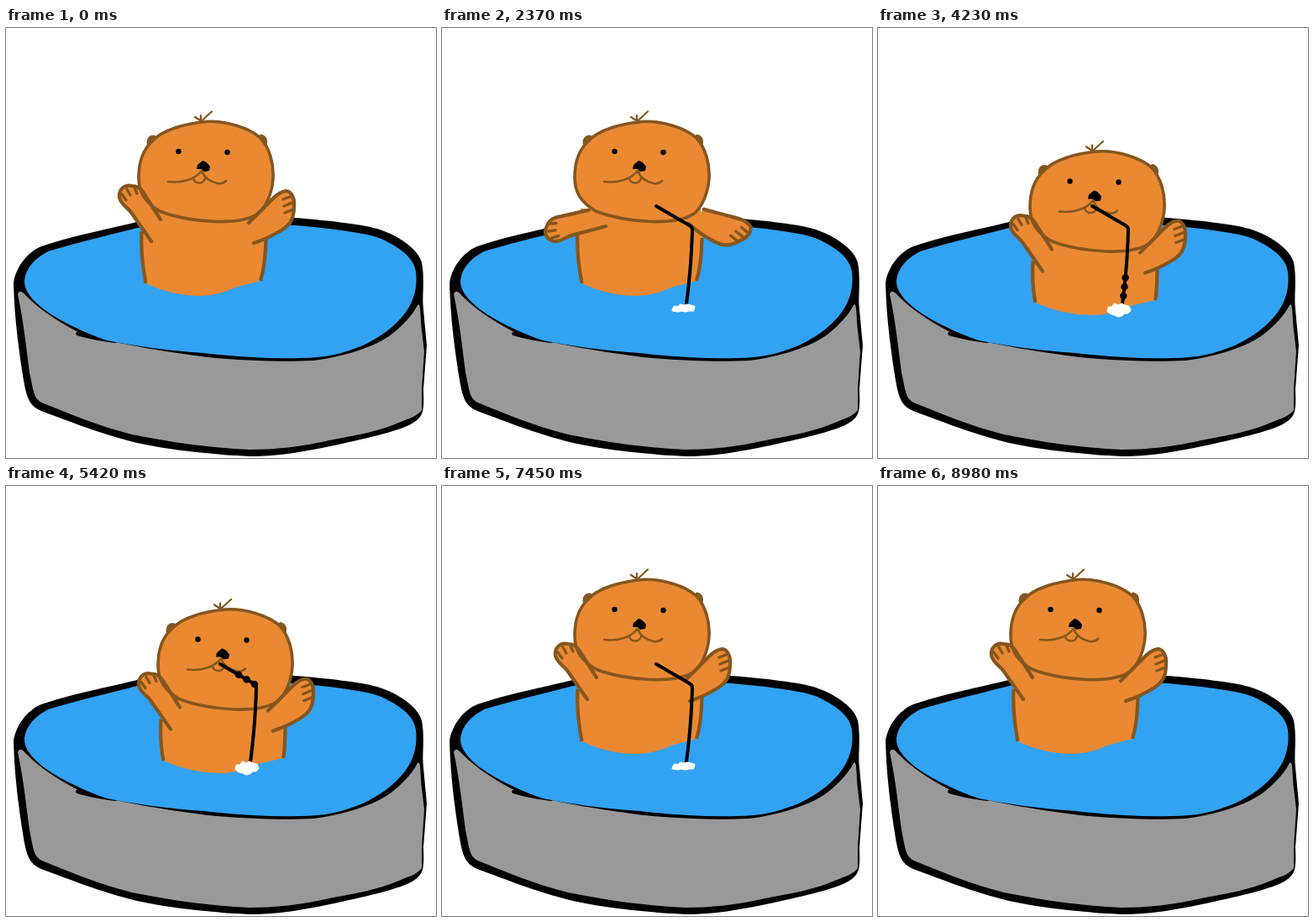
An HTML page for the animation above (9150 ms loop, 512 by 512 pixels).

```html
<!DOCTYPE html>
<html lang="en">
<head>
<meta charset="utf-8">
<title>Otter in the pool</title>
<style>
html, body { margin: 0; width: 100%; height: 100%; overflow: hidden; background: #fff; }
svg { display: block; width: 100%; height: 100%; }
.fur { fill: #ea8932; }
.line { fill: none; stroke: #85561f; stroke-width: 4.2; stroke-linecap: round; stroke-linejoin: round; }
.thin { stroke-width: 2.6; }
.claw { stroke-width: 3.4; }
.hair { stroke-width: 2.2; }
</style>
</head>
<body>
<svg viewBox="0 0 512 512">
  <defs>
    <clipPath id="above"><path d="M0 0H512V329H0Z"/></clipPath>
    <path id="armL" d="M184 228L168 203C163 195 160 188 150 188C140 186 134 193 135 202C138 212 144 212 150 221L173 254"/>
    <path id="armR" d="M289 232L310 211C318 203 324 195 334 194C340 195 344 203 343 212C343 228 338 235 326 242Q311 251 295 256"/>
  </defs>

  <g id="pool">
    <path d="M9 303C12 285 25 267 42 260C80 247 120 240 160 230C220 223 300 223 345 226C380 229 420 233 442 239C465 246 490 262 495 279C499 300 495 320 497 335L501 378L497 430C498 455 497 461 488 468C475 478 440 486 400 495C350 506 320 510 290 510C230 507 180 500 148 492C100 479 70 466 42 456C28 450 25 440 22 425C17 395 10 350 9 303Z"/>
    <path fill="#999" d="M14 317C16 311 20 314 24 319C43 338 68 353 90 364C150 380 190 385 240 392C280 396 330 398 365 396C400 392 440 380 460 364C475 352 485 340 490 330C494 326 493 340 495 360L498 385L495 430L495 455C490 462 480 465 470 469C440 482 410 486 390 490C350 499 320 502 290 502C240 500 190 492 150 484C110 474 80 461 45 447C32 442 33 432 28 410C24 380 21 350 14 317Z"/>
    <path fill="none" stroke="#000" stroke-width="4" stroke-linecap="round" d="M85 364Q100 369 130 373"/>
    <path fill="#32a2f2" d="M22 300C24 285 35 274 50 266C90 254 130 245 160 237C220 230 300 232 345 235C390 239 430 244 447 251C470 262 485 273 488 290C490 305 487 320 480 332C470 350 450 366 425 378C400 388 380 393 350 393C310 394 270 391 235 387C190 384 150 378 120 372C90 362 60 346 45 335C30 323 21 312 22 300Z"/>
  </g>

  <g id="otter">
    <path id="body" class="fur"/>
    <path id="sides" class="line" style="stroke-linecap:butt"/>
    <use href="#armL" class="fur left"/>
    <use href="#armR" class="fur right"/>
    <path class="line" d="M170 137Q170 130 176 130M304 129Q310 131 308 139" style="stroke-width:5"/>
    <path class="line" style="fill:#ea8932;stroke-width:3.6" d="M158 178C158 158 163 145 174 135C186 121 213 114 238 111.5C262 110 290 119 303 131C314 143 319 162 318 179C317 195 311 211 301 220.500C288 230 264 231 248 230.500C224 229 200 225 183 218C166 208 158 196 158 178Z"/>
    <path class="line hair" d="M225 106L232 110.500L232 104M233 110.500L245 99.500"/>
    <circle cx="205.5" cy="147" r="3.2"/>
    <circle cx="263.5" cy="148" r="3.2"/>
    <path class="line thin" d="M193 183C210 185 225 180 233 170C236 178 243 183 252 185Q258 186 262 182M223 178C223 186 235 187 237 179"/>
    <path d="M234 158Q238 158 243 165L242 170L236 171L233 168L227 168L228 163Z"/>
    <g class="left">
      <use href="#armL" class="line"/>
      <path class="line claw" d="M138 198L143 205M144 192L148 199M153 190L156 197"/>
    </g>
    <g class="right">
      <use href="#armR" class="line"/>
      <path class="line claw" d="M330 204L338 201M331 212L341 208M332 220L342 216"/>
    </g>
  </g>

  <g clip-path="url(#above)">
    <path id="straw" fill="none" stroke="#000" stroke-width="4" stroke-linecap="round" stroke-linejoin="round"/>
  </g>
  <g id="bubbles"><circle r="4.200"/><circle r="4.200"/><circle r="4.200"/></g>
  <path id="foam" fill="#fff" stroke="#fff" stroke-width="3" stroke-linejoin="round"/>
</svg>
<script>
const $ = s => document.querySelector(s);
const LOOP = 9150, STEP = 170;
// Each scene: start time and number of poses; the last pose is held.
const SCENES = [[0, 10], [2030, 9], [3890, 14], [6600, 15]];
const FOAM_LOW = "M275 336L277 332L281 333L284 330L288 331L292 330L296 331L300 332L299 336L294 336L290 337L285 336L281 337Z";
const FOAM_HIGH = "M274 337L275 333L279 333L282 329L286 331L290 329L294 331L298 332L300 336L297 339L293 339L290 342L286 343L282 341L278 340Z";
const clamp = (v, a, b) => Math.min(b, Math.max(a, v));

function pose(t) {
  let scene = SCENES.length - 1;
  while (t < SCENES[scene][0]) scene--;
  const [start, count] = SCENES[scene];
  const i = Math.min(count - 1, Math.floor((t - start) / STEP));
  const p = { rise: 9, dip: 0, drop: 0, lead: -1 };
  if (scene === 0) p.rise = i;
  if (scene === 1) {
    p.drop = clamp(1 - Math.abs(i - 2) / 3, 0, 1);
    p.dip = clamp((i - 4) / 4, 0, 1);
  }
  if (scene === 2) {
    p.dip = 1;
    p.lead = 8 + 12 * i;
  }
  if (scene === 3) {
    p.dip = clamp(1 - i / 4, 0, 1);
    p.rise = clamp(14 - i, 0, 9);
  }
  p.sway = Math.sin(Math.PI * p.rise / 9);
  return p;
}

function setArm(side, x, y, dx, dy, turn) {
  document.querySelectorAll("." + side).forEach(el =>
    el.setAttribute("transform", `translate(${dx} ${dy}) rotate(${turn} ${x} ${y})`));
}

function drawOtter({ dip, drop, sway }) {
  $("#otter").setAttribute("transform", `translate(${23 * dip} ${35.5 * dip})`);
  const up = 12.5 * dip, l = 166.5 - 2 * dip, r = 303 + 4 * dip;
  const lb = 304 - up, rb = 301 - up, low = 319 - up;
  const left = `Q160 270 ${l} ${lb}`, right = `Q309 282 ${r} ${rb}`;
  $("#body").setAttribute("d",
    `M165 215L161 246${left}Q198 ${low} 232 ${low}Q252 ${low} 273 ${low - 10}L${r} ${rb}Q309 282 310 254L308 215Z`);
  $("#sides").setAttribute("d", `M161.5 242${left}M309.5 250${right}`);
  setArm("left", 179, 241, 6 * drop - sway, -15 * drop - 6.5 * sway, -70 * drop + 4 * sway);
  setArm("right", 292, 245, 10 * drop - sway, -20 * drop + 7 * sway, 60 * drop);
}

function drawStraw({ rise, lead }) {
  const straw = $("#straw");
  const bend = clamp((rise - 5) / 4, 0, 1);
  const x = 295 + 3 * bend, y = 321 - 21 * (rise - 5);
  const tx = x - 20 - 23 * bend, ty = y - 41 + 16 * bend;
  const nx = x + (tx - x) * .08, ny = y + (ty - y) * .08;
  straw.setAttribute("d",
    `M291 ${Math.max(329, y + 8)}Q${x - 1} ${(329 + y) / 2} ${x} ${y + 3}Q${x} ${y} ${nx} ${ny}L${tx} ${ty}`);
  straw.style.display = rise > 2 ? "" : "none";

  const length = straw.getTotalLength();
  [...$("#bubbles").children].forEach((dot, n) => {
    const d = lead - 11 * n;
    const shown = lead >= 0 && d > 0 && d < length;
    dot.style.display = shown ? "" : "none";
    if (!shown) return;
    const at = straw.getPointAtLength(d);
    dot.setAttribute("cx", at.x);
    dot.setAttribute("cy", at.y);
  });

  const foam = $("#foam");
  foam.style.display = rise > 1 ? "" : "none";
  foam.setAttribute("d", lead >= 0 ? FOAM_HIGH : FOAM_LOW);
}

function render(t) {
  const p = pose(t % LOOP);
  drawOtter(p);
  drawStraw(p);
}

const begin = performance.now();
function tick() {
  render(performance.now() - begin);
  requestAnimationFrame(tick);
}
tick();
</script>
</body>
</html>
```
